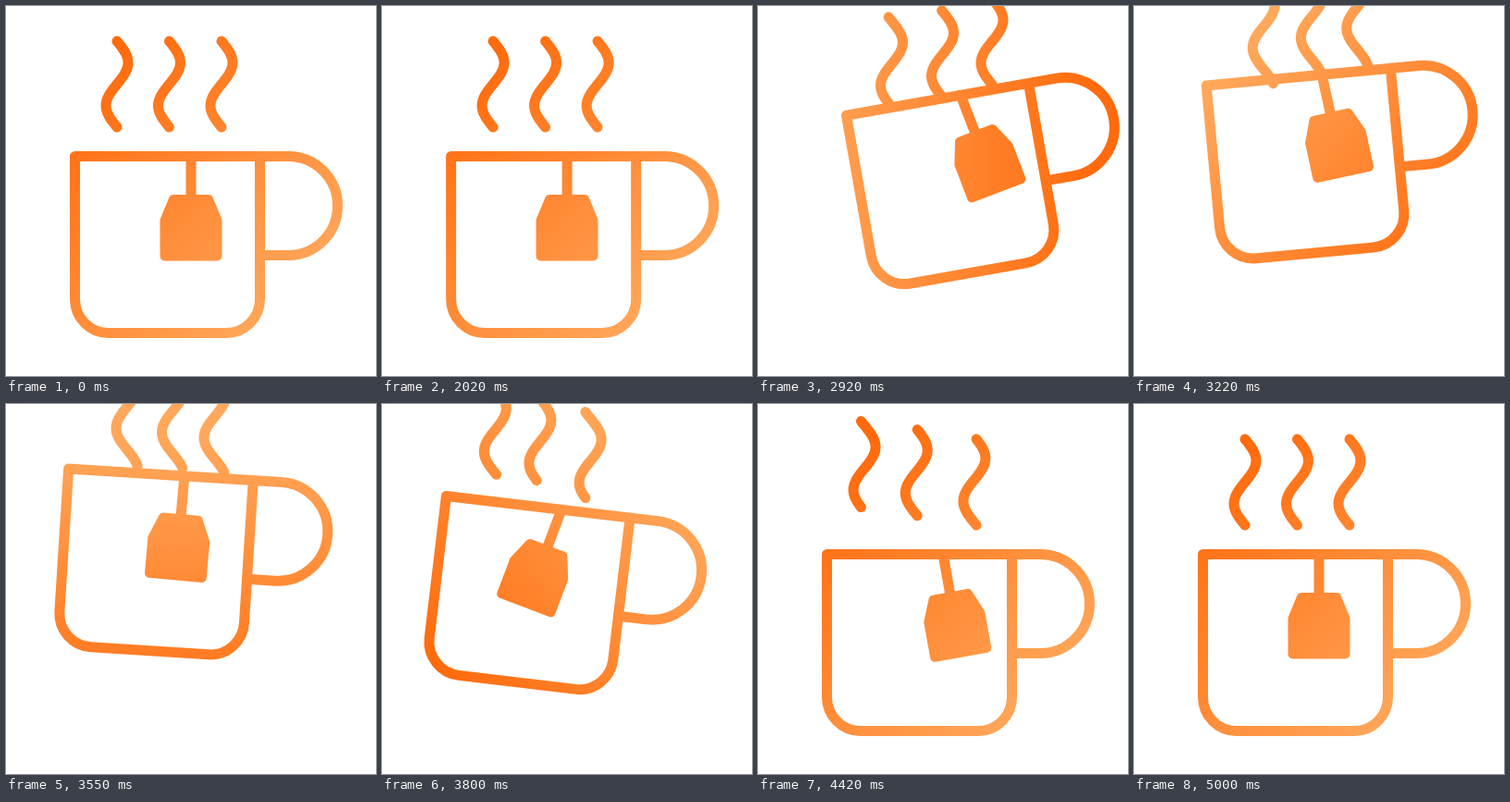
An HTML page that plays this animation: 400 by 400 pixels, repeating every 5.2 s.

```html
<!DOCTYPE html>
<html lang="en">
<head>
<meta charset="utf-8">
<title>Tea cup</title>
<style>
html, body { margin: 0; width: 100%; height: 100%; overflow: hidden; background: #fff; }
svg { display: block; width: 100%; height: 100%; }
</style>
</head>
<body>
<svg viewBox="0 0 400 400">
  <defs>
    <linearGradient id="warm" gradientUnits="userSpaceOnUse" x1="83" y1="83" x2="317" y2="317">
      <stop offset="0" stop-color="#ff6a0c"/>
      <stop offset="1" stop-color="#ffa85c"/>
    </linearGradient>
    <mask id="shape" maskUnits="userSpaceOnUse" x="0" y="0" width="400" height="400">
      <g fill="none" stroke="#fff" stroke-width="11" stroke-linecap="round" stroke-linejoin="round">
        <path class="steam"/>
        <path class="steam"/>
        <path class="steam"/>
        <g id="cup">
          <path d="M274.5 269.5H305a53.5 53.5 0 0 0 0-107H74.5V317a36.5 36.5 0 0 0 36.5 36.5H238a36.5 36.5 0 0 0 36.5-36.5V162.5"/>
          <g id="bag">
            <path d="M200 162.5V209"/>
            <path fill="#fff" stroke-width="10" d="M181 209H219L228.500 232V270.500H171.500V232Z"/>
          </g>
        </g>
      </g>
    </mask>
  </defs>
  <rect width="400" height="400" fill="url(#warm)" mask="url(#shape)"/>
</svg>
<script>
const LOOP = 5200, START = 2000;
const find = id => document.getElementById(id);
const cup = find('cup'), bag = find('bag'), warm = find('warm');
const steamPaths = document.querySelectorAll('.steam');

// Smooth curve through [time, value] keys, flat at peaks and at both ends.
function curve(times, values) {
  const last = times.length - 1;
  const rate = i => (values[i + 1] - values[i]) / (times[i + 1] - times[i]);
  const slope = values.map((v, i) => {
    if (i === 0 || i === last) return 0;
    const a = rate(i - 1), b = rate(i);
    return a * b <= 0 ? 0 : 2 * a * b / (a + b);
  });
  return t => {
    if (t <= times[0]) return values[0];
    if (t >= times[last]) return values[last];
    let i = 0;
    while (t > times[i + 1]) i++;
    const d = times[i + 1] - times[i], u = (t - times[i]) / d, w = 1 - u;
    return w * w * ((1 + 2 * u) * values[i] + u * d * slope[i])
      + u * u * ((1 + 2 * w) * values[i + 1] - w * d * slope[i + 1]);
  };
}

const cupX = curve([0, 420, 680, 920, 1100, 1550, 1700, 2020, 2260], [0, 28.7, 38, 36, 22, -13, -20, -4.5, 0]);
const cupY = curve([0, 420, 550, 920, 1100, 1320, 1550, 2020, 2260], [0, -11.5, -22, -63, -79, -89, -86.5, -15.5, 0]);
const cupTurn = curve([0, 420, 920, 1100, 1550, 1780, 2020, 2260], [0, -2, -10, -8, 3.6, 6.8, 4.8, 0]);
const bagTurn = curve([0, 380, 920, 1550, 2000, 2380, 2680, 3000], [0, 6.5, -21, 5, 28, -11, 4, 0]);
const lightTurn = curve([0, 420, 920, 1550, 2020, 2400], [0, 45, 135, 225, 315, 360]);
const wave = curve([0, 400, 920, 1300, 1560, 2080, 2500, 2850], [0, -0.25, 0, 0.23, 0.15, -0.28, 0.06, 0]);

const steamTimes = [0, 420, 920, 1280, 1550, 1780, 2020, 2350, 2750, 3000];
const steams = [
  { x: 120, lag: 80, dx: [0, 13, 24.5, 19, 11, 3, -4, -5, -3, 0], dy: [0, -6, -26, -51, -64, -56, -35, -22, -8, 0] },
  { x: 176.5, lag: 20, dx: [0, 16, 23, 14, 4, -5, -10, -6, -2, 0], dy: [0, -8, -33, -57, -62, -50, -26, -12, -4, 0] },
  { x: 233, lag: 0, dx: [0, 22, 20, 6, -7, -8, 0, 1, 0, 0], dy: [0, -12, -46, -65, -57, -32, -3, 0, 0, 0] }
].map(s => ({ x: s.x, lag: s.lag, dx: curve(steamTimes, s.dx), dy: curve(steamTimes, s.dy) }));

function steamLine(s, t) {
  const x = s.x + s.dx(t), y = 38 + s.dy(t), phase = wave(t - s.lag);
  const points = Array.from({ length: 33 }, (_, i) => {
    const u = i / 32;
    return (x + 12 * Math.sin(2 * Math.PI * (u + phase))).toFixed(2) + ' ' + (y + 93 * u).toFixed(2);
  });
  return 'M' + points.join('L');
}

function draw(now) {
  const t = now % LOOP - START;
  const turn = cupTurn(t);
  cup.setAttribute('transform', `translate(${cupX(t)} ${cupY(t)}) rotate(${turn} 174.500 257.500)`);
  bag.setAttribute('transform', `rotate(${bagTurn(t) - turn} 200 162.500)`);
  warm.setAttribute('gradientTransform', `rotate(${lightTurn(t)} 200 200)`);
  steams.forEach((s, i) => steamPaths[i].setAttribute('d', steamLine(s, t)));
}

const begin = performance.now();
function tick() {
  draw(performance.now() - begin);
  requestAnimationFrame(tick);
}
tick();
</script>
</body>
</html>
```
